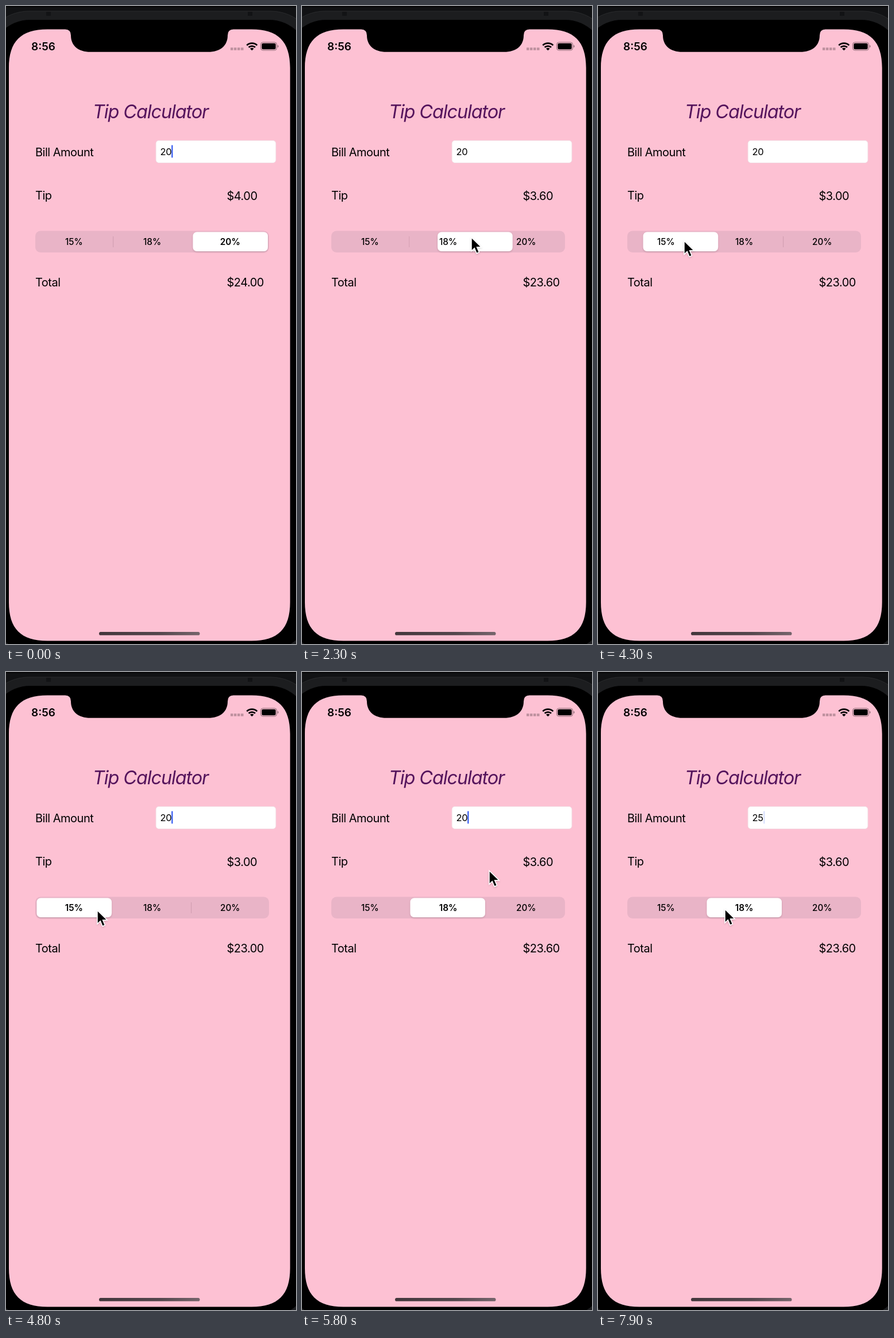
An HTML page for the animation above (8 s loop, 505 px wide and 1108 px high).

```html
<!DOCTYPE html>
<html lang="en">
<head>
<meta charset="utf-8">
<title>Tip Calculator</title>
<style>
html, body { margin: 0; width: 100%; height: 100%; overflow: hidden; background: #000; }
svg { display: block; width: 100%; height: 100%; }
text { font: 20px Inter, "Liberation Sans", sans-serif; font-optical-sizing: none; letter-spacing: -.5px; }
#title { font-size: 32.5px; font-style: italic; letter-spacing: -1.15px; fill: #55145c; }
#clock { font-size: 19px; font-weight: 600; letter-spacing: 0; }
#bill { font-size: 16.5px; letter-spacing: -.2px; }
#labels text { font-size: 15.3px; font-weight: 500; letter-spacing: 0; text-anchor: middle; }
#labels text.on { font-weight: 600; }
</style>
</head>
<body>
<svg viewBox="0 0 505 1108">
  <defs>
    <linearGradient id="bar">
      <stop stop-color="#43373c"/><stop offset=".6" stop-color="#54474d"/><stop offset="1" stop-color="#76656c"/>
    </linearGradient>
    <filter id="soft" x="-20%" y="-20%" width="150%" height="160%">
      <feDropShadow dx="0" dy="1.5" stdDeviation="1.5" flood-opacity=".16"/>
    </filter>
  </defs>

  <!-- phone body -->
  <rect width="505" height="1108" fill="#111214"/>
  <path d="M0 1H505" stroke="#050506" stroke-width="2"/>
  <rect x="-42" y="9" width="585" height="1125" rx="82" fill="#1c1d1f" stroke="#2a2b2d"/>
  <path d="M70 10h8v7h-8zM421 10h8v7h-8z" fill="#121315"/>
  <rect x="-28" y="24" width="556" height="1095" rx="70"/>
  <path fill="#fdc1d3" d="M5 107.500C5 61.500 26 40.500 72 40.500H103Q113 40.500 113 51C113 69 126 79.800 147 79.800H352C373 79.800 386 69 386 51Q386 40.500 396 40.500H427.700C473.700 40.500 494.700 61.500 494.700 107.500V1035.500C494.700 1081.500 473.700 1102.500 427.700 1102.500H72C26 1102.500 5 1081.500 5 1035.500Z"/>

  <!-- status bar -->
  <text id="clock" x="44" y="77">8:56</text>
  <path d="M391 74.500H414" stroke="#000" stroke-opacity=".25" stroke-width="4.500" stroke-dasharray="4.500 1.500"/>
  <g fill="none" stroke="#000" stroke-width="2.700">
    <path d="M419.300 68.300A13 13 0 0 1 437.300 68.300M422.600 71.800A8.300 8.300 0 0 1 434 71.800"/>
  </g>
  <path d="M428.300 77.300L425 74Q428.300 71.300 431.600 74Z"/>
  <rect x="443.500" y="63" width="28" height="14" rx="4" fill="none" stroke="#000" stroke-opacity=".45"/>
  <rect x="445.300" y="64.800" width="24.400" height="10.400" rx="2.300"/>
  <path d="M473 67.500q3 2.500 0 5z" fill-opacity=".5"/>

  <!-- form -->
  <text id="title" x="151" y="195">Tip Calculator</text>
  <text x="51" y="260.500">Bill Amount</text>
  <text x="51" y="336">Tip</text>
  <text x="51" y="487">Total</text>
  <rect x="261" y="233.500" width="209" height="39" rx="5" fill="#fff" stroke="#f3d6df"/>
  <text id="bill" x="268.500" y="259">20</text>
  <rect id="caret" x="288.200" y="241.500" width="2.200" height="22" rx="1" fill="#3158f0"/>
  <text id="tip" x="384.500" y="336.500"></text>
  <text id="total" x="384.500" y="487"></text>

  <!-- segmented control -->
  <rect x="51" y="390.500" width="407" height="37.500" rx="9" fill="#e9b4c7"/>
  <g id="seps" fill="#d39fb3">
    <rect x="186" y="400" width="1.200" height="19"/>
    <rect x="322" y="400" width="1.200" height="19"/>
  </g>
  <rect id="pill" y="392.500" width="130.500" height="33.500" rx="7" fill="#fff" filter="url(#soft)"/>
  <g id="labels">
    <text x="118.300" y="414.700">15%</text>
    <text x="254.500" y="414.700">18%</text>
    <text x="390.300" y="414.700">20%</text>
  </g>

  <rect x="162" y="1087" width="175.500" height="5.800" rx="2.900" fill="url(#bar)"/>
  <path id="mouse" d="M0 0V23.500L5.300 18.500 9 27.500 13.400 25.600 9.600 16.800H17.200Z" stroke="#fff" stroke-width="1.500" filter="url(#soft)"/>
</svg>

<script>
const LOOP = 8000, STEP = 100;
const RATES = [.15, .18, .2];
const TAPS = [[-9999, 2], [2155, 1], [4100, 0], [5350, 1]]; // time, segment
const PATH = [ // time, x, y of the pointer
  [1000, 520, 740], [1100, 480, 667], [1200, 440, 598], [1400, 365, 487],
  [1700, 316, 424], [2000, 295, 402], [2800, 295, 402], [3600, 189, 387],
  [3900, 150, 405], [4600, 150, 410], [4800, 159, 414], [5200, 255, 414],
  [5500, 264, 420], [5800, 326, 345], [6100, 408, 182], [6400, 344, 240],
  [7500, 344, 240], [7700, 290, 335], [7900, 221, 412]
];
const BLINK = [[0, 1], [200, 0], [350, 0], [600, 1]];

const el = id => document.getElementById(id);
const clamp = v => Math.max(0, Math.min(1, v));
const slotX = i => 53.5 + 136 * i;
const money = v => "$" + v.toFixed(2);

// linear interpolation of the values after the time in each key
function track(keys, t) {
  const i = keys.findIndex(k => k[0] > t);
  if (i === 0) return keys[0].slice(1);
  if (i < 0) return keys[keys.length - 1].slice(1);
  const a = keys[i - 1], b = keys[i], p = (t - a[0]) / (b[0] - a[0]);
  return a.slice(1).map((v, j) => v + (b[j + 1] - v) * p);
}

// input keeps the caret solid and restarts its blinking
function caretAlpha(t) {
  if (t >= 6900 && t < 7500) return 1;
  if (t >= 5600 && t < 6400) return 1;
  const u = t < 5600 ? t % 1000 : t < 6900 ? Math.min(t - 6400, 300) : t - 7500;
  return track(BLINK, u)[0];
}

function draw(t) {
  const n = TAPS.filter(k => k[0] <= t).length - 1;
  const [start, sel] = TAPS[n];
  const from = n ? TAPS[n - 1][1] : sel;
  const k = (t - start) * .0155;
  const x = slotX(sel) + (slotX(from) - slotX(sel)) * (1 + k) * Math.exp(-k);

  el("pill").setAttribute("x", x);
  [...el("labels").children].forEach((label, i) =>
    label.classList.toggle("on", Math.abs(x - slotX(i)) < 6));
  [...el("seps").children].forEach((sep, i) => {
    const s = 186.5 + 136 * i;
    sep.setAttribute("opacity", clamp((Math.max(x - s, s - x - 130.5) - 4) / 60));
  });

  el("tip").textContent = money(20 * RATES[sel]);
  el("total").textContent = money(20 + 20 * RATES[sel]);

  const bill = t < 6900 ? "20" : t < 7100 ? "2" : "25";
  el("bill").textContent = bill;
  el("caret").setAttribute("x", 268.2 + 10 * bill.length);
  el("caret").setAttribute("opacity", caretAlpha(t));

  el("mouse").setAttribute("visibility", t < 1100 ? "hidden" : "visible");
  el("mouse").setAttribute("transform", `translate(${track(PATH, t)})`);
}

let begin;
function frame(now) {
  begin ??= now;
  draw(Math.floor((now - begin) % LOOP / STEP) * STEP);
  requestAnimationFrame(frame);
}
draw(0);
requestAnimationFrame(frame);
</script>
</body>
</html>
```
